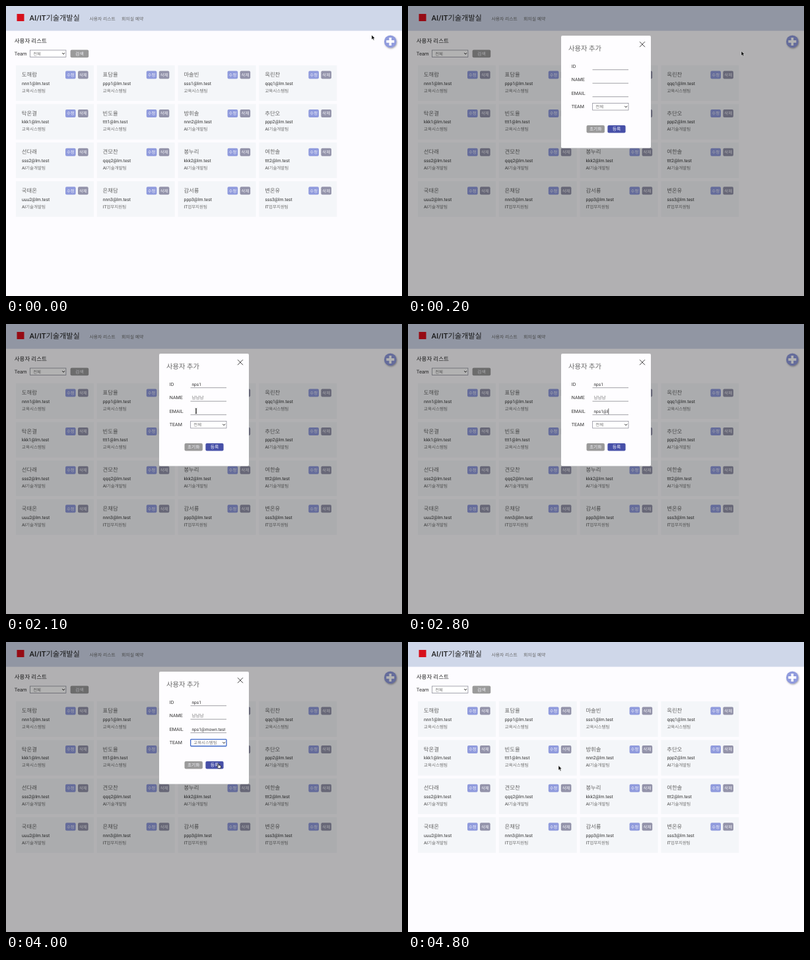
Recreate the animation shown at these times as an HTML page. Size 600 by 440 pixels, loop 4.9 s.

```html
<!DOCTYPE html>
<html>
<head>
<meta charset="utf-8">
<title>사용자 리스트</title>
<style>
  html, body { margin: 0; width: 100%; height: 100%; overflow: hidden; background: #fdfcff; }
  svg { display: block; width: 600px; height: 440px; }
  text {
    font-family: Roboto, "Noto Sans CJK KR", "Noto Sans CJK", sans-serif;
    text-rendering: geometricPrecision;
    white-space: pre;
  }
  .light { font-weight: 300; }
  .medium { font-weight: 500; }
  .latin { font-weight: 400; fill: #444; }
</style>
</head>
<body>
<svg id="stage" viewBox="0 0 600 440" xmlns="http://www.w3.org/2000/svg"></svg>
<script>
const LOOP = 4900, TICK = 100;
const BLUE = '#909bdd', SLATE = '#9393aa', GREY = '#9a9a9a', EDGE = '#80828e';

const rect = (x, y, w, h, fill, more = '') =>
  `<rect x="${x}" y="${y}" width="${w}" height="${h}" fill="${fill}" ${more}/>`;
const text = (x, y, size, str, fill = '#333', more = '') =>
  `<text x="${x}" y="${y}" font-size="${size}" fill="${fill}" ${more}>${str}</text>`;
const line = (d, stroke, width, more = '') =>
  `<path d="${d}" fill="none" stroke="${stroke}" stroke-width="${width}" ${more}/>`;
const LIGHT = 'class="light"';

function button(x, y, w, h, fill, label, size) {
  return rect(x, y, w, h, fill, 'rx="2"') +
    text(x + w / 2, y + h / 2 + size * 0.36, size, label, '#f4f4fa', 'class="light" text-anchor="middle"');
}

function select(x, y, value, id = '') {
  return rect(x, y, 54.3, 10.4, '#fff', `stroke="${EDGE}" stroke-width=".7" ${id && `id="${id}Box"`}`) +
    text(x + 4.6, y + 7.5, 6.4, value, '#777', LIGHT + (id && ` id="${id}"`)) +
    line(`M${x + 48.6} ${y + 4.2}l1.9 2 1.9-2`, '#222', 1);
}

// Cards
const EDU = '교육시스템팀', DEV = 'AI기술개발팀', OPS = 'IT업무지원팀';
const names = ('도해람 표담율 마솔빈 옥린찬 탁온결 빈도율 방휘솔 추단오 ' +
  '선다래 견모찬 봉누리 여한솔 국태온 은채담 감서룡 변온유').split(' ');
const team = i => i < 6 ? EDU : i < 13 ? DEV : OPS;

function email(i) {
  const n = i < 6 ? i : i < 13 ? i - 6 : i - 13;
  return 'npsqktu'[n].repeat(3) + (i < 6 ? 1 : i < 13 ? 2 : 3) + '@lm.test';
}

function card(i, name, mail, group) {
  const x = 15 + (i % 4) * 122.8, y = 90 + Math.floor(i / 4) * 58.6;
  return rect(x, y, 118, 54, '#f4f6f9') +
    text(x + 8.8, y + 16.9, 8.4, name, '#666', LIGHT) +
    text(x + 9, y + 29.7, 6.8, mail, '#333') +
    text(x + 9, y + 40.8, 6.5, group.replace(/^[A-Z]+/, '<tspan class="latin">$&</tspan>'), '#707070', LIGHT) +
    button(x + 75, y + 8.5, 15.6, 12, BLUE, '수정', 6.4) +
    button(x + 94, y + 8.5, 15.6, 12, SLATE, '삭제', 6.4);
}

const header =
  rect(0, 0, 600, 37.6, '#cfd7e9') +
  rect(16.5, 12, 11, 11, '#d7101c') +
  text(35.6, 21.7, 11.2, 'AI/IT기술개발실', '#222', 'class="medium"') +
  text(126.6, 21.6, 6.8, '사용자 리스트', '#666', LIGHT) +
  text(175, 21.6, 6.9, '회의실 예약', '#666', LIGHT);

const page =
  rect(0, 0, 600, 440, '#fdfcff') + header +
  text(12.8, 55.5, 8.5, '사용자 리스트', '#222') +
  text(12.8, 74.8, 7.5, 'Team', '#333') +
  select(36.6, 67, '전체') +
  button(97.6, 66.6, 27.6, 11.6, GREY, '검색', 6.9) +
  names.map((n, i) => card(i, n, email(i), team(i))).join('') +
  `<g id="added">${card(16, '남남남', 'nps1@mown.test', EDU)}</g>` +
  `<circle cx="582.3" cy="53.9" r="9.3" fill="${BLUE}" filter="url(#shadow)"/>` +
  line('M576.3 53.9h12M582.3 47.9v12', '#fff', 3.6);

// Dialog
const labels = ['ID', 'NAME', 'EMAIL', 'TEAM'];
const rowY = r => 93.7 + r * 20.5;
const dialog =
  rect(232, 45, 136, 170.5, '#fefdff', 'rx="2"') +
  text(243, 68.3, 10.3, '사용자 추가', '#666', LIGHT) +
  line('M351 54.2l8 8M359 54.2l-8 8', '#222', 0.85) +
  labels.map((s, r) => text(247.8, rowY(r), 7.1, s, '#333')).join('') +
  [0, 1, 2].map(r =>
    line(`M279.5 ${rowY(r) + 3}h54.5`, '#8a8a8e', 0.8) +
    text(281.4, rowY(r), 6.6, '', r === 1 ? '#777' : '#333',
      `id="in${r}" clip-path="url(#field)" ` + (r === 1 ? LIGHT : ''))
  ).join('') +
  select(279.7, 147.6, '전체', 'team') +
  button(270.5, 181, 27.4, 11.6, GREY, '초기화', 6.7) +
  button(302.4, 181, 27.2, 11.6, '#4750a8', '등록', 6.9) +
  rect(0, 0, 0.6, 9, '#111', 'id="caret"');

const cursors =
  `<g id="arrow"><path d="M0 0v7l1.6-1.5 1.2 2.6 1.2-.5-1.2-2.6h2.2z" fill="#000" stroke="#fff" stroke-width=".5"/></g>` +
  `<g id="hand"><path d="M-1.2-3.4q.7-.8 1.3 0l.6 2 2 .4q1.3.4 1 1.8l-.5 2.6h-3.4l-2.2-2.7q0-1 1-.7l.8.6z" fill="#fff" stroke="#111" stroke-width=".8"/></g>` +
  `<g id="beam">${line('M-1.3-4q1.3 0 1.3 1V3q0 1-1.3 1M1.3-4Q0-4 0-3V3q0 1 1.3 1', '#111', 0.8)}</g>`;

const $ = id => document.getElementById(id);
$('stage').innerHTML =
  `<defs>
    <clipPath id="field"><rect x="280" y="80" width="52" height="60"/></clipPath>
    <filter id="shadow" x="-50%" y="-50%" width="200%" height="200%">
      <feDropShadow dx=".8" dy="1.2" stdDeviation="1.2" flood-color="#445" flood-opacity=".5"/>
    </filter>
  </defs>` + page +
  rect(0, 0, 600, 440, '#000', 'id="dim" opacity=".3"') +
  `<g id="dialog">${dialog}</g>` + cursors;

// Typing steps for each field: [time, value]
const typing = [
  [[900, 'n'], [1000, 'np'], [1100, 'nps'], [1200, 'nps1']],
  [[1500, 'ㄴ'], [1600, '남'], [1700, '남나'], [1800, '남남'], [1900, '남남나'], [2000, '남남남']],
  [[2400, 'n'], [2500, 'np'], [2600, 'nps1'], [2700, 'nps1@'], [2800, 'nps1@l'], [3000, 'nps1@'],
   [3100, 'nps1@mo'], [3200, 'nps1@mown'], [3300, 'nps1@mown.t'], [3400, 'nps1@mown.test']]
];

// Pointer stops: [time, x, y, shape, glides on to the next stop]
const stops = [
  [0, 554, 44, 'arrow'], [100, 582, 54, 'hand'],
  [200, 505, 68.5, 'arrow', true], [700, 290, 91, 'beam'], [900, 0, 0, ''],
  [1400, 288, 111.5, 'beam'], [1500, 0, 0, ''],
  [2100, 288, 132, 'beam'], [2400, 0, 0, ''],
  [3500, 322, 152, 'arrow'], [3800, 322, 154, 'arrow', true],
  [4000, 322, 188.3, 'hand'], [4100, 321, 183.7, 'arrow', true],
  [4500, 116, 341, 'hand'], [4800, 228, 187.6, 'arrow']
];

const latest = (list, t) => list.filter(s => s[0] <= t).pop();
const show = (id, on) => $(id).setAttribute('visibility', on ? 'visible' : 'hidden');

function movePointer(t) {
  const at = latest(stops, t), next = stops[stops.indexOf(at) + 1];
  let [from, x, y, shape, glide] = at;
  if (glide) {
    const p = (t - from) / (next[0] - from), e = p * (2 - p);
    x += (next[1] - x) * e;
    y += (next[2] - y) * e;
  }
  for (const id of ['arrow', 'hand', 'beam']) show(id, id === shape);
  if (shape) $(shape).setAttribute('transform', `translate(${x} ${y})`);
}

function render(t) {
  const open = t >= 200 && t < 4100;
  show('dim', open);
  show('dialog', open);
  show('added', t >= 4100 && t < 4700);

  let active = -1;
  typing.forEach((steps, r) => {
    const now = latest(steps, t);
    $('in' + r).textContent = now ? now[1] : '';
    if (now && t <= steps[steps.length - 1][0]) active = r;
  });
  show('caret', open && active >= 0);
  if (active >= 0) {
    const field = $('in' + active);
    $('caret').setAttribute('x', Math.min(331.4, 281.6 + field.getComputedTextLength()));
    $('caret').setAttribute('y', rowY(active) - 6.6);
  }

  const focus = t >= 3500, box = $('teamBox');
  $('team').textContent = t >= 3800 ? EDU : '전체';
  box.setAttribute('stroke', focus ? '#3d68c8' : EDGE);
  box.setAttribute('stroke-width', focus ? 1.3 : 0.7);
  box.setAttribute('rx', focus ? 1 : 0);
  movePointer(t);
}

const start = performance.now();
function tick() {
  const t = (performance.now() - start) % LOOP;
  render(Math.floor(t / TICK) * TICK);
  requestAnimationFrame(tick);
}
tick();
</script>
</body>
</html>
```
